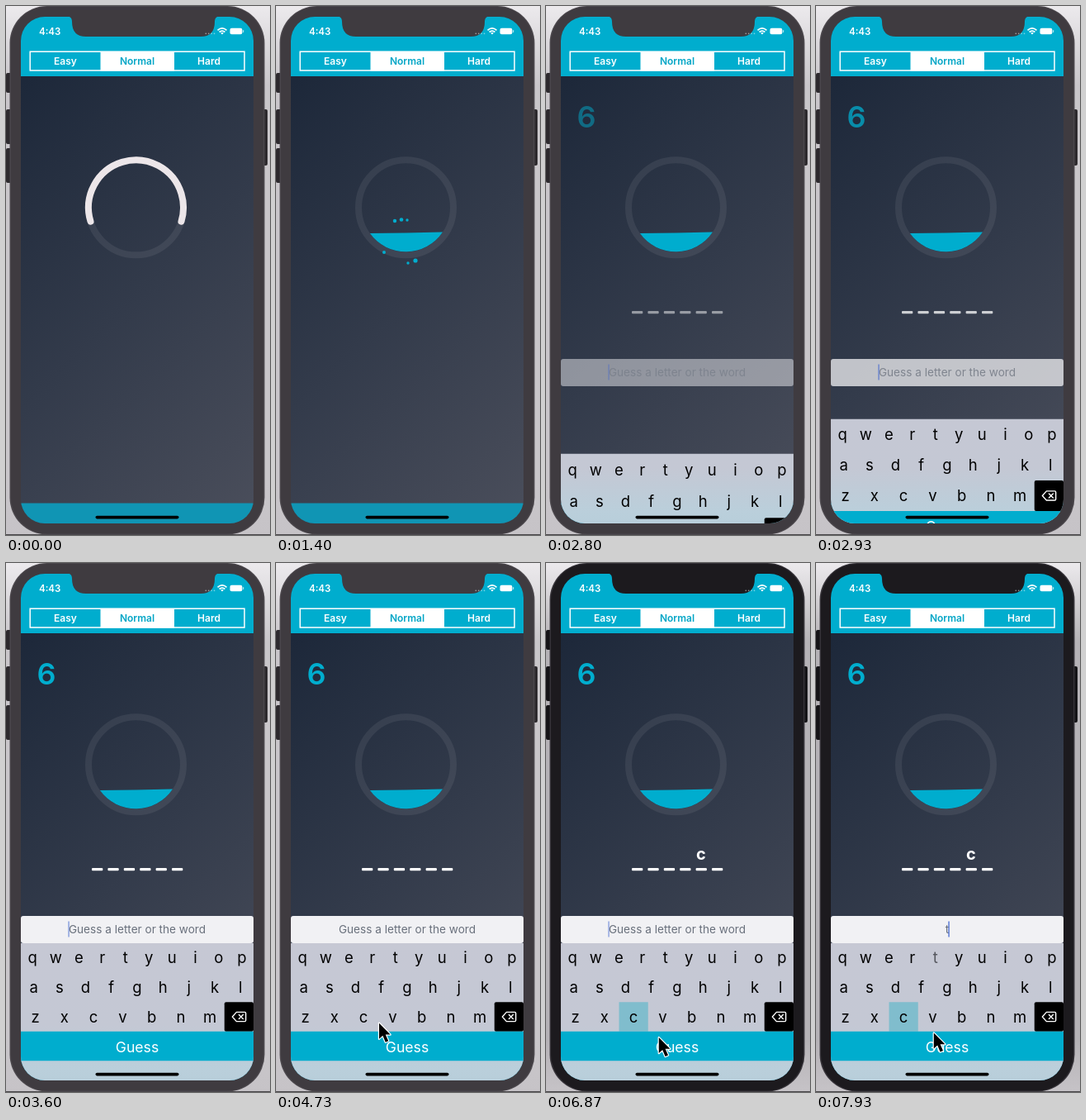
These frames come from a looping animation (320x640 px, 8 s). An HTML page with a canvas:

```html
<!DOCTYPE html>
<html lang="en">
<head>
<meta charset="utf-8">
<title>Word guessing game</title>
<style>
  html, body { margin: 0; width: 100%; height: 100%; overflow: hidden; }
  canvas { display: block; width: 320px; height: 640px; }
</style>
</head>
<body>
<canvas id="stage"></canvas>
<script>
const LOOP = 8000;
const CYAN = '#00adce';
const FONT = 'Inter, Roboto, sans-serif';
const ROWS = ['qwertyuiop', 'asdfghjkl', 'zxcvbnm<'];
const SCREEN = { x: 18, y: 13, w: 282, h: 613 };
const RING = { x: 157.5, y: 243.8, r: 57.5 };

// Moments of the story, in ms
const SHOW = 2630, ACTIVE = 5050, TYPE_C = 5200, GUESS = 6300, TYPE_T = 7750;

const MOUSE = [
  [4000, 283, 592], [4900, 108, 552], [5150, 108, 552], [5330, 118, 559],
  [5700, 118, 559], [6000, 136, 573], [6870, 136, 573], [7450, 148, 482],
  [7760, 148, 482], [7930, 142, 567.5]
];

// Splash drops: offset from the splash centre and radius
const DROPS = [[-14, -25.5, 2.2], [-6, -27, 2.3], [1, -26.5, 1.7],
               [-27, 12.5, 2], [2, 25.5, 1.7], [11, 22.5, 2.6]];

const canvas = document.getElementById('stage');
const dpr = window.devicePixelRatio || 1;
canvas.width = 320 * dpr;
canvas.height = 640 * dpr;
const ctx = canvas.getContext('2d');

const progress = (t, from, to) => Math.min(1, Math.max(0, (t - from) / (to - from)));
const easeOut = p => 1 - (1 - p) ** 2;
const smooth = p => p * p * (3 - 2 * p);

function box(x, y, w, h, color, radius = 0) {
  ctx.fillStyle = color;
  ctx.beginPath();
  ctx.roundRect(x, y, w, h, radius);
  ctx.fill();
}

function dot(x, y, r, color) {
  ctx.fillStyle = color;
  ctx.beginPath();
  ctx.arc(x, y, r, 0, 7);
  ctx.fill();
}

function text(str, x, y, size, color, weight = 400, align = 'center') {
  ctx.font = `${weight} ${size}px ${FONT}`;
  ctx.textAlign = align;
  ctx.fillStyle = color;
  ctx.fillText(str, x, y);
}

function shape(d, fill, stroke, width = 1) {
  const path = new Path2D(d);
  if (fill) { ctx.fillStyle = fill; ctx.fill(path); }
  if (stroke) { ctx.strokeStyle = stroke; ctx.lineWidth = width; ctx.stroke(path); }
}

function layer(draw, alpha = 1) {
  ctx.save();
  ctx.globalAlpha *= alpha;
  draw();
  ctx.restore();
}

function gradient(x0, y0, x1, y1, ...stops) {
  const g = ctx.createLinearGradient(x0, y0, x1, y1);
  stops.forEach(([at, color]) => g.addColorStop(at, color));
  return g;
}

function drawPhone(active) {
  const side = active ? '#b5b2b6' : '#c9c6ca';
  box(0, 0, 320, 640, gradient(0, 0, 0, 640,
    [0, '#eceaed'], [0.15, side], [0.9, side], [1, '#c6c3c7']));
  box(0, 639, 320, 1, '#4a484b');
  const body = active ? '#1c1a1e' : '#3f3b40';
  const knob = active ? '#151417' : '#2d2a2e';
  [[81, 24], [125, 42], [172, 42]].forEach(([y, h]) => box(0, y, 7, h, knob, 2));
  box(311, 125, 6, 68, knob, 2);
  box(4.5, 0, 309, 639.5, active ? '#353238' : '#4b474c', 45);
  box(6, 1, 306, 637.5, body, 44);
  return body;
}

function drawHeader(body) {
  box(18, 13, 282, 72, CYAN);
  shape('M74 12 H259 Q253 13 253 19 Q253 37 236 37 H97 Q80 37 80 19 Q80 13 74 12Z', body);
  text('4:43', 40, 35, 11.5, '#fff', 600, 'left');

  for (let i = 0; i < 4; i++) dot(242.3 + i * 3.4, 33.3, 0.9, '#ffffff77');
  ctx.lineCap = 'butt';
  shape('M256.5 29.3 Q262 24.6 267.5 29.3 M258.6 31.5 Q262 28.6 265.4 31.5', null, '#fff', 1.7);
  shape('M260.2 32.7 Q262 31.4 263.8 32.7 L262 34.6Z', '#fff');
  box(271.5, 26.8, 14.8, 7.4, '#fff', 2);
  box(287, 29, 1.2, 3, '#ffffffaa', 0.6);

  ctx.strokeStyle = '#fff';
  ctx.lineWidth = 1.5;
  ctx.strokeRect(29.2, 55.2, 259.8, 22.8);
  box(114.5, 55, 89.5, 23.5, '#fff');
  text('Easy', 72, 71, 12, '#fff', 600);
  text('Normal', 159, 71, 12, '#00a5c6', 600);
  text('Hard', 246, 71, 12, '#fff', 600);
}

function drawRing(t) {
  const arc = (half, color) => {
    ctx.strokeStyle = color;
    ctx.lineWidth = 8;
    ctx.lineCap = 'round';
    ctx.beginPath();
    ctx.arc(RING.x, RING.y, RING.r, -Math.PI / 2 - half, -Math.PI / 2 + half);
    ctx.stroke();
  };
  arc(Math.PI, '#ffffff12');
  const left = 1 - progress(t, 0, 650);
  if (left > 0) arc(1.87 * left, '#ece6e9');
}

function drawWater(t) {
  const pop = easeOut(progress(t, 950, 1300));
  if (pop) layer(() => {
    ctx.translate(158, 285.5);
    ctx.scale(pop, pop);
    ctx.translate(-158, -285.5);
    shape('M113.9 275 Q158 274.6 202 273.4 A53.5 53.5 0 0 1 113.9 275Z', CYAN);
  });

  const spread = easeOut(progress(t, 1100, 1450)) / 0.98;
  const size = 1 - progress(t, 1420, 1800);
  if (spread && size) DROPS.forEach(([dx, dy, r]) =>
    dot(158 + dx * spread, 285.5 + dy * spread, r * size, CYAN));
}

// The caret stays solid after each edit, then fades off and on
function caretAlpha(t) {
  const since = [3040, TYPE_C, GUESS, TYPE_T].filter(s => s <= t).pop();
  if (since === undefined) return 1;
  const phase = (t - since) % 1000;
  return phase < 900 ? 1 - progress(phase, 500, 690) : progress(phase, 900, 1000);
}

function drawGame(t) {
  text('6', 37.5, 147, 36, CYAN, 600, 'left');
  for (let i = 0; i < 6; i++) box(104 + i * 19.4, 369, 13.3, 3.2, '#fff', 1);
  layer(() => text('c', 188, 358.5, 20, '#fff', 700), progress(t, GUESS, GUESS + 200));

  box(18, 427, 282, 33, '#f1f1f4', 3);
  const typed = t >= TYPE_T ? 't' : t >= TYPE_C && t < GUESS ? 'c' : '';
  const caretX = typed === 't' ? 161 : typed === 'c' ? 162.8 : 76;
  text(typed || 'Guess a letter or the word', 159, 448, 13.6, '#69707c');
  layer(() => box(caretX - 0.6, 433.5, 1.3, 19, '#4267d0'), caretAlpha(t));
}

function drawKeyboard(t, shown) {
  const hidden = 1 - shown;
  const top = 460 + 160 * hidden;
  const rowH = 35.6 + 6 * hidden;
  box(18, top, 282, 626 - top + 1, gradient(0, 460, 0, 626,
    [0, '#c6c8d4'], [0.6, '#c4c8d4'], [0.92, '#bacfdb'], [1, '#b8ceda']));

  ROWS.forEach((row, r) => {
    const w = 282 / row.length, y = top + r * rowH;
    [...row].forEach((key, i) => {
      const x = 18 + w * i, mid = x + w / 2;
      if (key === '<') return drawDelete(x, y, w, rowH);
      if (key === 'c') layer(() => box(x, y, w, rowH, '#80bdcd'), progress(t, GUESS, GUESS + 200));
      const typedAt = { c: TYPE_C, t: TYPE_T }[key];
      const pressed = typedAt && t > typedAt - 100 && t < typedAt + 250;
      text(key, mid, y + rowH / 2 + 6.5, 18.5, pressed ? '#55575e' : '#000');
    });
  });

  const buttonY = top + rowH * 3;
  box(18, buttonY, 282, 35.5, CYAN);
  text('Guess', 159, buttonY + 24.8, 17.6, '#fff');
}

function drawDelete(x, y, w, h) {
  box(x, y, w, h, '#000', 2);
  layer(() => {
    ctx.translate(x + w / 2, y + h / 2);
    ctx.lineJoin = ctx.lineCap = 'round';
    shape('M-8 0 L-3 -5.6 H7 Q8.3 -5.6 8.3 -4.3 V4.3 Q8.3 5.6 7 5.6 H-3Z ' +
          'M0 -2.5 L5 2.5 M5 -2.5 L0 2.5', null, '#fff', 1.4);
  });
}

function drawMouse(t) {
  if (t < MOUSE[0][0]) return;
  const i = MOUSE.findIndex(k => k[0] > t);
  const end = i < 0 ? MOUSE.at(-1) : MOUSE[i];
  const start = i < 0 ? end : MOUSE[i - 1];
  const p = i < 0 ? 1 : smooth(progress(t, start[0], end[0]));
  layer(() => {
    ctx.translate(start[1] + (end[1] - start[1]) * p, start[2] + (end[2] - start[2]) * p);
    ctx.lineJoin = 'round';
    const arrow = 'M.8 1 V20 L5.2 16 L8.6 24 L12 22.5 L8.6 14.8 H14.4Z';
    shape(arrow, null, '#fff', 2.4);
    shape(arrow, '#000');
  });
}

function draw(t) {
  ctx.setTransform(dpr, 0, 0, dpr, 0, 0);
  const body = drawPhone(t >= ACTIVE);
  const shown = easeOut(progress(t, SHOW, SHOW + 600));

  layer(() => {
    ctx.beginPath();
    ctx.roundRect(SCREEN.x, SCREEN.y, SCREEN.w, SCREEN.h, 29);
    ctx.clip();
    box(18, 85, 282, 541, gradient(-40, 150, 358, 560, [0, '#1d283a'], [0.5, '#333b4b'], [1, '#4a4e5b']));
    drawHeader(body);
    box(18, 601.5, 282, 25, '#1095b4');
    drawRing(t);
    drawWater(t);
    if (shown) {
      layer(() => drawGame(t), shown);
      drawKeyboard(t, shown);
    }
    box(108.5, 616.8, 101, 3.6, '#000', 1.8);
  });
  drawMouse(t);
}

function frame() {
  draw(performance.now() % LOOP);
  requestAnimationFrame(frame);
}
frame();
</script>
</body>
</html>
```
